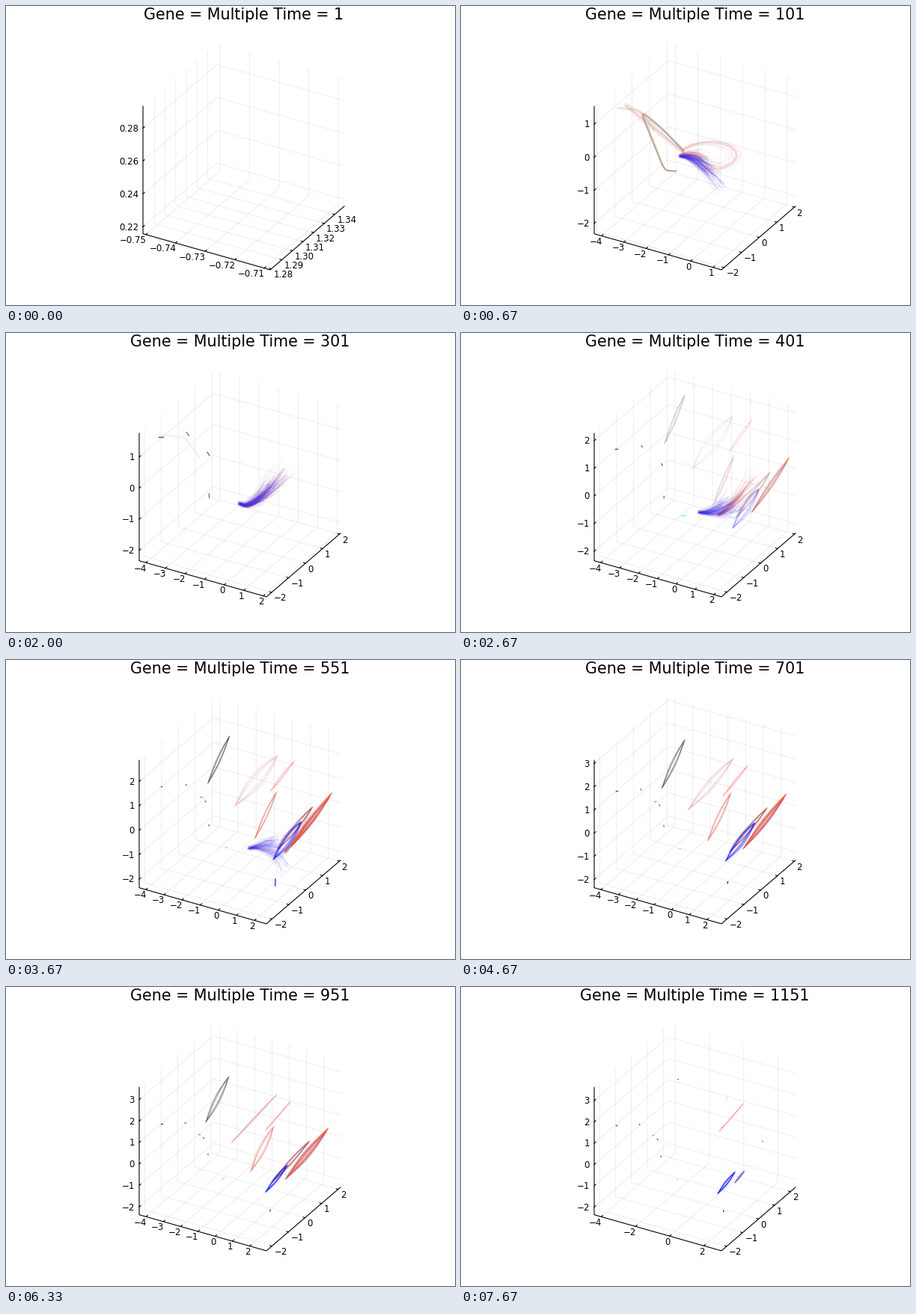
A matplotlib script for the animation above (8000 ms loop, 600 px wide and 400 px high).

```python
import numpy as np
import matplotlib.pyplot as plt
from matplotlib.animation import FuncAnimation
from matplotlib.collections import LineCollection
from matplotlib.colors import to_rgba

W, H, DPI = 600, 400, 100
FRAMES, LOOP_MS = 24, 8000
PX = 72 / DPI  # points per pixel
AXES = np.array([[170, 48.2], [99, -85], [0, -170.5]])  # box edges on screen
CORNER = np.array([178, 304.7])
SEED = np.array([366, 152])  # where every path starts
SETTLED = 19  # frame whose scale places the loops and spots

plt.rcParams["font.family"] = "DejaVu Sans"
fig = plt.figure(figsize=(W / DPI, H / DPI), dpi=DPI, facecolor="white")
ax = fig.add_axes([0, 0, 1, 1])
rng = np.random.default_rng(7)


def ease(u):
    u = np.clip(u, 0, 1)
    return u * u * (3 - 2 * u)


def limits(t):
    """Low and high ends of the three axes, widening as the paths spread."""
    if t == 0:
        return np.array([-0.751, 1.279, 0.2157]), np.array([-0.708, 1.349, 0.2933])
    low = [-4.32 - 0.004 * t,
           -2.33 + 0.18 * np.exp((2 - t) / 2),
           -2.3 - 0.07 * (1 - np.exp(-t / 8))]
    high = [3.1 - 1.72 * np.exp((2 - t) / 6.6),
            2.06 + 0.26 * (t / 23) ** 6,
            np.interp(t, (2, 6, 10, 14, 19, 23), (1.54, 1.76, 2.77, 3.14, 3.57, 3.63))]
    return np.array(low), np.array(high)


def project(point, t):
    low, high = limits(t)
    return CORNER + (point - low) / (high - low) @ AXES


def world(px, py, y=-1.1):
    """Data point at depth y that shows at (px, py) once the scale has settled."""
    low, high = limits(SETTLED)
    fy = (y - low[1]) / (high[1] - low[1])
    dx, dy = (px, py) - CORNER - fy * AXES[1]
    fx = dx / AXES[0, 0]
    fz = (dy - fx * AXES[0, 1]) / AXES[2, 1]
    return low + np.array([fx, fy, fz]) * (high - low)


def add_lines(lines, colors, alpha, width=1.0):
    rgba = [to_rgba(colors[i % len(colors)], alpha) for i in range(len(lines))]
    ax.add_collection(LineCollection(lines, colors=rgba, linewidths=width * PX,
                                     capstyle="projecting"))


class Wisp:
    """Early hairs around one curve, fading as the paths move on."""

    def __init__(self, colors, curve, spread, alpha, fade=3, n=24):
        self.colors, self.alpha, self.fade = colors, alpha, fade
        u = np.linspace(0, 1, 50)
        wave = np.outer(rng.normal(0, 1, n), 1 - u) + np.outer(rng.normal(0, 1, n), u)
        turn = rng.uniform(0, 2 * np.pi, n)
        drift = np.stack([wave * np.cos(turn)[:, None], wave * np.sin(turn)[:, None]], -1)
        width = spread * (0.4 + np.sin(np.pi * u))[:, None]
        self.lines = curve(u) + drift * width + rng.normal(0, spread / 10, drift.shape)

    def draw(self, t):
        alpha = self.alpha * min(t / 2, 1) * np.clip(1 - (t - 2) / self.fade, 0, 1)
        if alpha > 0:
            pull = min(t / 2, 1)
            add_lines(SEED + (self.lines - SEED) * pull, self.colors, alpha, 0.9)


class Fan:
    """Hairs bending from a narrow start to a swept row of ends."""

    TIMES = (2, 6, 10)

    def __init__(self, colors, poses, alpha, n=70):
        # a pose holds start, bend, end and half sweep, all in pixels
        self.poses, self.colors, self.alpha = np.array(poses, float), colors, alpha
        self.place = rng.uniform(-1, 1, n)
        self.reach = rng.uniform(0.6, 1.05, n)
        self.shift = rng.normal(0, 1, (n, 3, 2)) * np.array([1.5, 4, 5])[:, None]
        self.noise = rng.normal(0, 0.35, (n, 30, 2))

    def draw(self, t):
        alpha = self.alpha * min(t / 2, 1) * np.clip((14 - t) / 4, 0, 1)
        if alpha <= 0:
            return
        k = np.interp(t, self.TIMES, range(3))
        i = min(int(k), 1)
        pose = self.poses[i] + (self.poses[i + 1] - self.poses[i]) * (k - i)
        knots = SEED + (pose[:3] - SEED) * min(t / 2, 1)
        lines = []
        for place, reach, shift, noise in zip(self.place, self.reach, self.shift, self.noise):
            p0, p1, p2 = knots + shift + np.outer((0, 0.4, 1), pose[3] * place)
            u = np.linspace(0, reach, 30)[:, None]
            lines.append((1 - u) ** 2 * p0 + 2 * u * (1 - u) * p1 + u * u * p2 + noise)
        add_lines(lines, self.colors, alpha, 0.9)


class Loop:
    """Leaf-shaped cycles from base to tip that later shrink towards a rest point."""

    def __init__(self, colors, base, tip, rest, widths, settle=1.0, since=19,
                 inner=0.4, alpha=0.04, n=24):
        self.base, self.tip, self.rest = world(*base), world(*tip), world(*rest)
        self.colors, self.widths, self.alpha = colors, widths, alpha
        self.settle, self.since = settle, since
        self.fat = rng.uniform(inner, 1.1, n)
        self.ends = rng.normal(0, 0.02, (n, 2))

    def draw(self, t):
        if t <= 7:
            return
        a, b, rest = (project(p, t) for p in (self.base, self.tip, self.rest))
        b = a + (b - a) * (0.8 + 0.2 * ease((t - 6) / 10))
        left = 1 - self.settle * ease((t - self.since) / (23 - self.since))
        a, b = rest + (a - rest) * left, rest + (b - rest) * left
        width = np.interp(t, (10, SETTLED), self.widths) * left
        axis = b - a
        normal = np.array([-axis[1], axis[0]]) / max(np.hypot(*axis), 1)
        th = np.linspace(0, 2 * np.pi, 60)
        lines = []
        for fat, (e0, e1) in zip(self.fat, self.ends):
            u = e0 + (1 + e1 - e0) * (1 - np.abs(1 - th / np.pi))
            p = a + np.outer(u, axis) + np.outer(np.sin(th) * width * fat / 2, normal)
            p[:, 0] += 0.4 * np.cos(th)
            lines.append(p)
        add_lines(lines, self.colors, self.alpha * min((t - 7) / 3, 1))


class Spot:
    """Settled group: a dash that shortens to a dot."""

    def __init__(self, color, px, py, angle=0.0, start=5, depth=-1.1, width=1.4):
        self.color, self.point = color, world(px, py, depth)
        self.half = np.array([np.cos(angle), np.sin(angle)])
        self.start, self.width = start, width

    def draw(self, t):
        if t >= self.start:
            reach = self.half * (0.6 + 4 * np.exp((self.start - t) / 1.5))
            center = project(self.point, t)
            add_lines([[center - reach, center + reach]], [self.color], 0.85, self.width)


def polyline(*points):
    """Rounded curve through a few points."""
    xy = np.array(points, float).T
    knots = np.linspace(0, 1, len(points))

    def curve(u):
        offsets = np.linspace(-0.05, 0.05, 7)
        return sum(np.column_stack([np.interp(u + d, knots, c) for c in xy])
                   for d in offsets) / len(offsets)
    return curve


def swirl(u):
    angle = np.pi * (1.1 + 1.5 * u)
    return np.column_stack([331 + 37 * np.cos(angle), 200 + 18 * np.sin(angle)])


PALE = ["#f49a9a", "#c8b4b4", "#f6b6c2"]
parts = [
    Wisp(PALE, polyline((219, 132), (260, 165), (300, 198)), 5, 0.13),
    Wisp(PALE, swirl, 5, 0.13),
    Wisp(["#8a7a30", "#b08a60", "#8c8490", "#d09a80"],
         polyline((300, 196), (270, 165), (240, 140), (257, 182), (272, 220), (289, 221)),
         1.2, 0.11),
    Wisp(["#f49aa8", "#b0a070"], polyline((209, 136), (239, 140), (259, 167)), 1.5, 0.08, 6, 12),
    Fan(["#f0704a", "#f08a70", "#a040a0"],
        [[(294, 200), (312, 197), (334, 210), (6, 12)],
         [(315, 229), (328, 240), (375, 183), (7, 5)],
         [(373, 257), (390, 236), (415, 201), (3, 3)]], 0.12),
    Fan(["#1a1aff", "#3a30f0", "#7030d8", "#5040e0"],
        [[(293, 201), (316, 202), (342, 228), (8, 18)],
         [(312, 228), (328, 240), (366, 190), (7, 6)],
         [(325, 252), (356, 245), (370, 259), (4, 24)]], 0.13, 100),
    Loop(["black"], (267, 180), (298, 120), (291, 120), (5, 8)),
    Loop(["#f0509a"], (302, 207), (362, 144), (358, 147), (22, 2), inner=0.3, alpha=0.025),
    Loop(["#ff4060"], (347, 191), (381, 153), (351, 184), (4, 1), settle=0, alpha=0.02),
    Loop(["#f03828"], (327, 246), (358, 187), (351, 185), (5, 10), alpha=0.035),
    Loop(["#a03030", "#704050", "#e05040"], (356, 260), (406, 206), (405, 204), (9, 6),
         alpha=0.07),
    Loop(["#8040b0", "#5040d0"], (374, 256), (428, 194), (366, 262), (6, 10),
         settle=0.75, alpha=0.06),
    Loop(["#ff4a20", "#ff7040"], (375, 255), (431, 189), (428, 189), (7, 8), inner=0.0,
         alpha=0.09, n=30),
    Loop(["#1010ff"], (351, 271), (390, 224), (337, 280), (14, 8), settle=0.4, since=13,
         inner=0.3, alpha=0.09),
    Spot("#1c4a24", 208, 183),
    Spot("#606060", 239.5, 182, 0.9),
    Spot("#8c8c7c", 258, 196.5, start=9),
    Spot("#6a5a10", 264, 202, 1.0),
    Spot("#6e6412", 270, 224, 1.5, depth=1.36),
    Spot("#40e8e8", 290, 256, start=7, width=1),
    Spot("#1010c8", 353, 299, 1.6, start=11),
]


def draw_box(t):
    low, high = limits(t)
    first = t == 0
    wide = high[0] - low[0] > 7.38
    steps = (0.01, 0.01, 0.02) if first else (2 if wide else 1, 1, 1)
    decimals = 2 if first else 0
    corner = CORNER + (5 if first else 0, 0)
    ex, ey, ez = AXES
    # per axis: origin, two grid legs, tick, label offset, label alignment
    layout = [(corner, ey, ez, (2, -1.7), (1, 11.3), "right"),
              (corner + ex, -ex, ez, (-2.5, -0.7), (3, 11.5), "left"),
              (corner, ey, ex, (2, -1.7), (-6, 4.3), "right")]
    grid, marks = [], [[corner + ez, corner, corner + ex, corner + ex + ey]]
    for axis, lo, hi, step, (origin, leg1, leg2, tick, offset, align) in zip(
            AXES, low, high, steps, layout):
        for k in range(int(np.ceil(lo / step)), int(np.floor(hi / step)) + 1):
            p = origin + axis * (k * step - lo) / (hi - lo)
            grid.append([p, p + leg1, p + leg1 + leg2])
            marks.append([p, p + tick])
            label = f"{k * step:.{decimals}f}".replace("-", "\u2212")
            ax.text(*(p + offset), label, ha=align, va="baseline", size=11.8 * PX)
    add_lines(grid, ["black"], 0.085, 0.8)
    add_lines(marks, ["black"], 1, 1.1)
    ax.text(corner[0] + 134.5, 18.3, f"Gene = Multiple Time = {t * 50 + 1}",
            ha="center", va="baseline", size=20.7 * PX)


def draw(t):
    ax.clear()
    ax.set_axis_off()
    ax.set_xlim(0, W)
    ax.set_ylim(H, 0)
    draw_box(t)
    for part in parts:
        part.draw(t)
    return []


anim = FuncAnimation(fig, draw, frames=FRAMES, interval=LOOP_MS // FRAMES,
                     init_func=lambda: [], repeat=True, repeat_delay=0)
plt.show()
```
